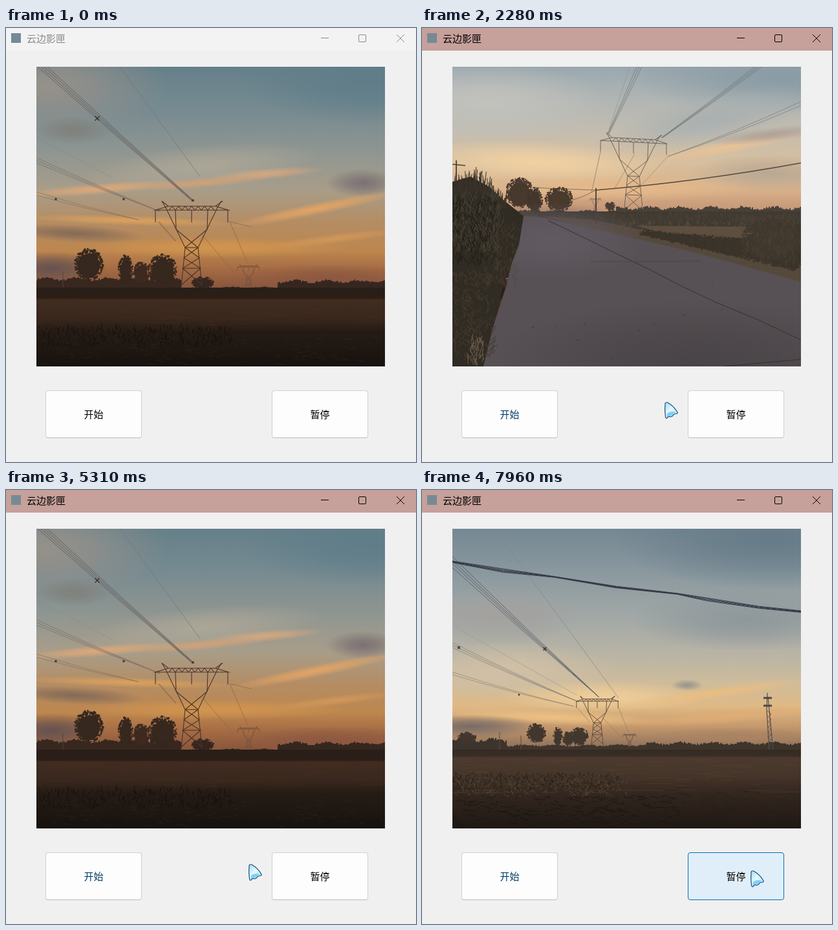
Animation, 634 px wide and 672 px high, one loop 8 s. Source, as an HTML page with a canvas:

```html
<!DOCTYPE html>
<html lang="zh-CN">
<head>
<meta charset="utf-8">
<title>云边影匣</title>
<style>
html, body { margin: 0; width: 100%; height: 100%; overflow: hidden; background: #f0f0f0; }
body { position: relative; font: 15px/20px "Noto Sans CJK SC", "Noto Sans CJK", "Noto Sans", sans-serif; }
body * { box-sizing: border-box; }
header, canvas, .button, .cursor { position: absolute; }
header { left: 0; top: 0; width: 634px; height: 35px; animation: activate 8s step-end infinite; }
header span { position: absolute; left: 32px; top: 6px; white-space: nowrap; }
header i { position: absolute; left: 8px; top: 8px; width: 15px; height: 15px; background: #758a94; }
header svg { position: absolute; left: 0; top: 0; fill: none; stroke: currentColor; }
canvas { left: 47px; top: 60px; }
#road { animation: road 8s step-end infinite; }
#field { animation: field 8s step-end infinite; }
.button {
  top: 561px; width: 149px; height: 74px; border: 1px solid #d0d0d0; border-bottom-color: #bfbbb5;
  border-radius: 4px; background: #fdfdfd; text-align: center; line-height: 71px; color: #000;
}
#start { left: 61px; animation: start 8s linear infinite; }
#pause { left: 411px; animation: pause 8s linear infinite; }
.cursor { left: 0; top: 0; width: 24px; height: 29px; animation: move 8s linear infinite; }
.glint { animation: glint 1142.857ms 351ms linear infinite; }

@keyframes activate {
  0% { background: #f3f3f3; color: #8a8a8a; }
  15% { background: #c6a09a; color: #000; }
}
@keyframes road {
  0%, 41.31%, 80.06% { opacity: 0; }
  28.43%, 67.19% { opacity: 1; }
}
@keyframes field {
  0%, 54.19% { opacity: 0; }
  41.31%, 80.06% { opacity: 1; }
}
@keyframes start {
  0%, 6.5% { background: #fdfdfd; border-color: #d0d0d0 #d0d0d0 #bfbbb5; color: #000; }
  9.5%, 15% { background: #e0eef9; border-color: #0078d4; color: #000; }
  15.5%, 16.2% { background: #cce4f7; border-color: #005499; color: #000; }
  16.8% { background: #e0eef9; border-color: #0078d4; color: #000; }
  25%, 100% { background: #fdfdfd; border-color: #d0d0d0 #d0d0d0 #bfbbb5; color: #003e66; }
}
@keyframes pause {
  0%, 86% { background: #fdfdfd; border-color: #d0d0d0 #d0d0d0 #bfbbb5; }
  89%, 90% { background: #e0eef9; border-color: #0078d4; }
  91%, 92% { background: #cce4f7; border-color: #005499; }
  93.4%, 100% { background: #e0eef9; border-color: #0070b4; }
}
@keyframes move {
  0%, 4.11% { transform: translate(264px, 623px); opacity: 0; }
  4.12% { transform: translate(264px, 623px); opacity: 1; animation-timing-function: ease-out; }
  13.25%, 15.5% { transform: translate(165px, 597px); animation-timing-function: ease-in-out; }
  19.1% { transform: translate(370px, 579px); animation-timing-function: ease-out; }
  21%, 83.6% { transform: translate(374px, 578px); animation-timing-function: ease-in-out; }
  93.6% { transform: translate(480px, 588px); animation-timing-function: ease-out; }
  99.4%, 100% { transform: translate(507px, 588px); opacity: 1; }
}
@keyframes glint {
  0%, 22%, 100% { opacity: .75; }
  8%, 14% { opacity: 0; }
}
</style>
</head>
<body>
<header>
  <i></i><span>云边影匣</span>
  <svg width="634" height="35">
    <path d="M487 15.5h12M604 10l12 12m0-12l-12 12"/>
    <rect x="545.5" y="10.5" width="11" height="11" rx="1.5"/>
  </svg>
</header>
<canvas id="sunset" width="539" height="464"></canvas>
<canvas id="road" width="539" height="464"></canvas>
<canvas id="field" width="539" height="464"></canvas>
<div class="button" id="start">开始</div>
<div class="button" id="pause">暂停</div>
<svg class="cursor" viewBox="0 0 24 29">
  <defs>
    <linearGradient id="ice" x2="1" y2="1">
      <stop offset=".1" stop-color="#aee2fb"/>
      <stop offset=".45" stop-color="#e6f7ff"/>
      <stop offset="1" stop-color="#a6ddfb"/>
    </linearGradient>
  </defs>
  <path d="M2 4Q2 1 6 2Q16 8 21 17Q22 19.500 18 19.500Q15 19.500 14 22Q12 25 9 23.500Q7 23 5.500 25.500Q3 27.500 2.500 24Q1 14 2 4Z" fill="url(#ice)" stroke="#1d4c70" stroke-width="1.2"/>
  <path class="glint" d="M5 19Q10 14 19 17.500Q14 18 12.500 22Q8 22 4 25Z" fill="#5fc6fa"/>
</svg>
<script>
let seed = 7;
const random = () => (seed = seed * 16807 % 2147483647) / 2147483647;
const between = (a, b) => a + random() * (b - a);

// Photo painter whose coordinates are those of the whole window.
function painter(id) {
  const g = document.getElementById(id).getContext('2d');
  g.translate(-47, -60);

  function trace(points) {
    g.beginPath();
    for (let i = 0; i < points.length; i += 2) g.lineTo(points[i], points[i + 1]);
  }
  function line(color, width, ...points) {
    trace(points);
    g.strokeStyle = color;
    g.lineWidth = width;
    g.stroke();
  }
  function shape(color, ...points) {
    trace(points);
    g.fillStyle = color;
    g.fill();
  }
  // Vertical gradient band; stops are pairs of y and colour.
  function band(top, bottom, ...stops) {
    const fill = g.createLinearGradient(0, top, 0, bottom);
    for (let i = 0; i < stops.length; i += 2)
      fill.addColorStop((stops[i] - top) / (bottom - top), stops[i + 1]);
    g.fillStyle = fill;
    g.fillRect(47, top, 539, bottom - top);
  }
  function cloud(color, x, y, rx, ry, tilt = 0) {
    g.save();
    g.translate(x, y);
    g.rotate(tilt);
    g.scale(rx, ry);
    const fill = g.createRadialGradient(0, 0, 0, 0, 0, 1);
    fill.addColorStop(0, color);
    fill.addColorStop(.4, color + 'b0');
    fill.addColorStop(1, color + '00');
    g.fillStyle = fill;
    g.fillRect(-1, -1, 2, 2);
    g.restore();
  }
  function wire(color, width, x1, y1, x2, y2, sag = 0) {
    g.beginPath();
    g.moveTo(x1, y1);
    g.quadraticCurveTo((x1 + x2) / 2, (y1 + y2) / 2 + sag, x2, y2);
    g.strokeStyle = color;
    g.lineWidth = width;
    g.stroke();
  }
  function bundle(color, count, gap, x1, y1, x2, y2, sag) {
    for (let i = 0; i < count; i++) wire(color, .8, x1 + i * gap, y1, x2 + i, y2, sag);
  }
  function spacer(x, y, r = 2.5) {
    line('#3b2d2c', 1.3, x - r, y - r, x + r, y + r);
    line('#3b2d2c', 1.3, x + r, y - r, x - r, y + r);
  }
  function tree(color, x, y, rx, ry) {
    g.fillStyle = color;
    g.beginPath();
    g.ellipse(x, y + ry * .1, rx * .85, ry * .85, 0, 0, 7);
    g.fill();
    for (let i = 0; i < rx * ry; i++) {
      const a = between(0, 6.283), d = between(.7, 1.12);
      g.beginPath();
      g.arc(x + Math.cos(a) * d * rx, y + Math.sin(a) * d * ry, between(.5, 1.6), 0, 7);
      g.fill();
    }
  }
  function treeline(color, x1, x2, y, height, bottom) {
    g.fillStyle = color;
    for (let x = x1; x < x2; x += 2) {
      const top = y - height * (.35 + .25 * Math.sin(x * .13)) - between(0, height * .4);
      g.fillRect(x, top, 2, bottom - top);
    }
  }
  function strokes(count, color, x1, x2, y1, y2, length, rise = 0) {
    for (let i = 0; i < count; i++) {
      const x = between(x1, x2), y = between(y1, y2), lean = between(-1, 1) * length;
      line(color, 1, x, y, x + lean, y - between(.3, 1) * rise);
    }
  }
  function pylon(x, y, size, color, width = 1, tilt = 0) {
    const part = (...p) => {
      const points = [];
      for (let i = 0; i < p.length; i += 2)
        points.push(x + p[i] * size, y + (p[i + 1] + p[i] * tilt) * size);
      line(color, width, ...points);
    };
    part(-46, 0, -36, 8, 37, 8, 48, 0, 37, 8, 57, 14, -56, 14, -36, 8);
    for (const s of [-1, 1]) {
      part(s * 46, 0, s * 40, 10, s * 10, 72, s * 16, 132);
      part(s * 25, 14, s * 24, 44, s * -10, 72);
      part(s * 56, 14, s * 56, 33);
      part(s * 10, 72, s * -12, 88, s * 14, 104, s * -16, 130);
    }
    for (let i = -35; i < 35; i += 10) part(i, 14, i + 5, 8, i + 10, 14);
    part(0, 14, 0, 33);
    part(-10, 72, 10, 72);
    part(-14, 104, 14, 104);
  }
  return { line, shape, band, cloud, wire, bundle, spacer, tree, treeline, strokes, pylon };
}

function paintSunset() {
  const p = painter('sunset');
  p.band(60, 410, 60, '#65808a', 130, '#788b91', 200, '#929791', 250, '#a89d89',
    300, '#b48d64', 345, '#bd864e', 375, '#a36a43', 410, '#80503b');
  p.cloud('#96918a', 60, 90, 190, 80);
  p.cloud('#7f817c', 105, 158, 60, 22);
  p.cloud('#5f7d89', 560, 80, 200, 70);
  p.cloud('#aba697', 300, 215, 190, 34, -.1);
  p.cloud('#d5a77f', 400, 226, 95, 9, -.08);
  p.cloud('#dea878', 145, 249, 130, 9, -.08);
  p.cloud('#d1a178', 300, 240, 110, 8, -.08);
  p.cloud('#7b7173', 552, 240, 58, 22);
  p.cloud('#e2a465', 480, 280, 140, 10, -.2);
  p.cloud('#dca05c', 190, 298, 170, 8, .03);
  p.cloud('#846b58', 105, 318, 110, 14, .05);
  p.cloud('#d2954e', 320, 340, 210, 16);
  p.cloud('#d09759', 510, 326, 110, 8, -.12);
  p.cloud('#655250', 70, 372, 85, 26);
  p.cloud('#8d5841', 500, 388, 150, 22);

  p.bundle('#5c5655', 4, 5, 49, 60, 288, 268, 2);
  p.wire('#69747a', .7, 176, 60, 300, 230);
  p.wire('#8a8886', .6, 47, 170, 165, 232);
  for (const y of [201, 205, 209]) p.wire('#776e67', .7, 47, y, 238, 284, 3);
  for (const y of [254, 259]) p.wire('#86705f', .7, 47, y, 205, 297, 3);
  p.wire('#84654f', .7, 303, 320, 352, 378);
  p.wire('#84654f', .7, 346, 300, 374, 365);
  p.bundle('#84654f', 2, 2, 235, 300, 262, 330, 0);
  p.wire('#84654f', .7, 346, 300, 380, 308);
  p.spacer(141, 140, 3.5);
  p.spacer(182, 265, 1.5);
  p.spacer(77, 265, 1.5);
  p.spacer(289, 267, 1.5);

  p.pylon(375, 366, .3, '#76503f', .7);
  p.treeline('#37271f', 47, 270, 393, 8, 405);
  p.treeline('#35271f', 270, 420, 404, 4, 410);
  p.treeline('#35271f', 420, 586, 396, 7, 410);
  p.tree('#37281f', 128, 366, 20, 22);
  p.tree('#37281f', 185, 375, 10, 21);
  p.tree('#3c2a20', 209, 380, 11, 16);
  p.tree('#37281f', 242, 375, 20, 22);
  p.tree('#35261f', 304, 394, 15, 8);
  p.pylon(287, 268, 1, '#4a332b', 1.1);
  p.line('#55423a', 1, 88, 377, 88, 415);
  p.band(402, 524, 402, '#2a1e18', 418, '#2b1e17', 421, '#412c20', 450, '#39271d', 470, '#251b15', 524, '#17120f');
  p.strokes(90, '#4b33254d', 47, 570, 422, 460, 60);
  p.strokes(260, '#14100d', 47, 350, 465, 495, 5, 9);
  p.strokes(160, '#3a2b2170', 47, 580, 475, 522, 12, 3);
}

function paintRoad() {
  const p = painter('road');
  p.band(60, 300, 60, '#99a8ae', 110, '#b0b5b4', 160, '#c3bdb0', 210, '#d8bf9e', 250, '#d8b18a', 285, '#c39474');
  p.cloud('#c2c2bd', 100, 115, 190, 60);
  p.cloud('#899ba4', 560, 75, 240, 60);
  p.cloud('#a9b0b0', 450, 140, 160, 40, -.2);
  p.cloud('#f0d1a3', 180, 208, 200, 34, .05);
  p.cloud('#e8c296', 470, 185, 140, 11, -.18);
  p.cloud('#b0a198', 540, 165, 100, 12, -.12);
  p.cloud('#baa893', 540, 225, 130, 30);
  p.cloud('#e6ba8a', 300, 248, 220, 20);

  p.bundle('#777b7b', 3, 4, 332, 60, 287, 164, 2);
  p.wire('#919594', .7, 321, 60, 287, 164);
  p.bundle('#6b7072', 3, 5, 515, 60, 370, 170, 2);
  for (const y of [114, 120]) p.wire('#808080', .8, 586, y, 380, 199, 5);
  p.wire('#887b6e', .8, 276, 192, 262, 255);
  p.wire('#988674', .7, 380, 199, 335, 248);
  p.wire('#988674', .7, 329, 195, 297, 250);
  p.pylon(327, 164, .91, '#625a54', .9, .05);
  p.pylon(268, 263, .16, '#957963', .7);
  p.wire('#786b60', .9, 130, 244, 269, 251, 2);
  p.wire('#51483f', 1.3, 269, 251, 586, 209, 8);
  p.wire('#6c5f54', .8, 228, 268, 269, 251, 3);

  p.treeline('#484035', 130, 300, 287, 6, 300);
  p.treeline('#47413a', 300, 586, 283, 8, 300);
  p.tree('#48392d', 151, 255, 19, 21);
  p.tree('#43372d', 174, 267, 11, 18);
  p.tree('#4a3a2e', 212, 265, 19, 17);
  p.tree('#4a4037', 291, 276, 7, 6);
  p.shape('#403a31', 180, 284, 586, 284, 586, 395, 370, 338, 180, 293);
  p.shape('#5e4e3f', 330, 306, 530, 308, 500, 325, 400, 325);
  p.strokes(420, '#4c4236', 200, 586, 290, 306, 2, 7);
  p.shape('#55493c', 185, 291, 260, 296, 400, 325, 586, 355, 586, 394, 380, 342);
  for (let x = 350; x < 586; x += 14) p.tree('#3b342b', x, 318 + (x - 350) * .16, 13, 4 + (x - 350) * .07);
  p.tree('#40382d', 545, 326, 45, 28);
  p.strokes(260, '#51473780', 490, 583, 295, 372, 8, 12);
  p.strokes(150, '#5f5241', 230, 500, 303, 320, 3, 6);
  p.line('#493e36', 1.8, 269, 248, 269, 303);

  p.shape('#575054', 157, 291, 185, 293, 270, 312, 420, 347, 586, 393, 586, 524, 90, 524, 130, 400);
  p.cloud('#625a62', 200, 330, 150, 60);
  p.cloud('#494447', 420, 520, 320, 100);
  p.line('#37312f', 1, 195, 298, 245, 322, 300, 349, 350, 373, 400, 399, 455, 425, 520, 452, 586, 483);
  p.line('#37312f', 1.2, 466, 524, 586, 513);
  p.line('#4b4245', .8, 260, 362, 430, 361);
  p.strokes(18, '#3c3537', 170, 480, 390, 515, 4);

  p.shape('#302b23', 47, 238, 75, 230, 104, 246, 128, 268, 157, 291, 150, 335, 125, 400, 95, 524, 47, 524);
  for (let x = 47; x < 130; x += 3)
    p.strokes(4, '#3a3329', x, x + 3, 250 + Math.max(0, x - 95) * .7, 262 + Math.max(0, x - 95) * .6, 4, 40 - Math.abs(x - 78) * .5);
  p.strokes(280, '#464034', 47, 120, 260, 350, 9, 14);
  p.strokes(200, '#211d18', 47, 115, 270, 370, 7, 14);
  p.strokes(220, '#52463680', 95, 148, 300, 400, 6, 10);
  p.strokes(260, '#453b2e', 47, 110, 380, 515, 10, 10);
  p.strokes(50, '#6b5b48', 70, 95, 485, 524, 7, 14);
  p.line('#4a403a', 1.8, 53, 205, 53, 238);
  p.line('#4a403a', 1.5, 47, 211, 67, 213);
}

function paintField() {
  const p = painter('field');
  p.band(60, 410, 60, '#758894', 130, '#8b999f', 200, '#a3a9a7', 255, '#b9b4a5',
    300, '#cfbc9b', 335, '#dfb985', 365, '#c79a6d', 395, '#94755d');
  p.cloud('#667b88', 540, 75, 250, 80);
  p.cloud('#a3a19e', 120, 195, 130, 45);
  p.cloud('#d1c0a6', 130, 280, 170, 45);
  p.cloud('#8e979b', 500, 200, 180, 50);
  p.cloud('#efce99', 280, 320, 160, 24);
  p.cloud('#e9bd82', 455, 314, 150, 10, -.14);
  p.cloud('#98948c', 410, 302, 25, 9);
  p.cloud('#edc083', 200, 352, 180, 12, .04);
  p.cloud('#dfad74', 470, 350, 150, 12, -.08);
  p.cloud('#776b66', 75, 366, 110, 18);
  p.cloud('#a98362', 480, 382, 140, 14);

  for (const y of [103, 109, 114, 120]) p.wire('#59616a', .9, 47, y, 274, 321, 3);
  p.wire('#7a868b', .7, 112, 60, 304, 322);
  p.wire('#989895', .6, 47, 210, 240, 318);
  for (const y of [236, 240, 244]) p.wire('#827f7a', .7, 47, y, 242, 328, 4);
  for (const y of [282, 286]) p.wire('#8e8373', .7, 47, y, 235, 335, 4);
  p.wire('#917b66', .7, 304, 337, 320, 377);
  p.wire('#917b66', .7, 278, 351, 308, 383);
  p.wire('#917b66', .7, 241, 338, 260, 360);
  p.spacer(57, 244, 2);
  p.spacer(190, 246);
  p.spacer(150, 317, 1);
  for (let i = 0; i < 4; i++)
    p.line('#343946', 1.1, 47, 110 + i * .7, 125, 122 + i * 1.7, 205, 134 + i * .4, 300, 149 + i * .8,
      395, 160 + i * .5, 440, 167 + i * 1.5, 520, 180 + i, 586, 187 + i * .8);

  p.pylon(321, 377, .18, '#6e594b', .7);
  p.treeline('#3c342d', 47, 130, 392, 9, 407);
  p.treeline('#40352d', 130, 350, 398, 5, 407);
  p.treeline('#3d342b', 347, 586, 396, 7, 412);
  p.tree('#41372e', 69, 384, 13, 8);
  p.tree('#41372e', 177, 376, 13, 13);
  p.tree('#41372e', 210, 381, 6, 12);
  p.tree('#44382e', 226, 385, 7, 10);
  p.tree('#41372e', 243, 381, 13, 12);
  p.pylon(271, 319, .575, '#58493e', .9);
  p.line('#5a4d47', 1, 120, 375, 120, 402);
  p.line('#5a4d47', 1, 153, 380, 153, 404);
  p.line('#504d4a', 1.2, 534, 314, 533, 340, 537, 404);
  p.line('#504d4a', 1.2, 535, 320, 543, 404);
  for (let y = 342; y < 400; y += 8) p.line('#504d4a', .8, 534, y, 540, y + 5, 536, y + 8);
  for (const y of [322, 334]) p.line('#4a494b', 3, 528, y, 541, y);
  p.band(402, 524, 402, '#352b23', 411, '#382d24', 415, '#4b3a2d', 440, '#46362a', 470, '#33271f', 524, '#1f1813');
  p.strokes(110, '#5c493960', 47, 570, 415, 470, 55);
  p.strokes(300, '#272019', 47, 305, 441, 466, 6, 7);
  p.strokes(220, '#554535', 47, 320, 450, 475, 5, 5);
  p.strokes(230, '#1c1612', 47, 400, 475, 522, 16, 4);
  p.strokes(110, '#241b1560', 340, 570, 460, 522, 28, -8);
}

paintSunset();
paintRoad();
paintField();
</script>
</body>
</html>
```
